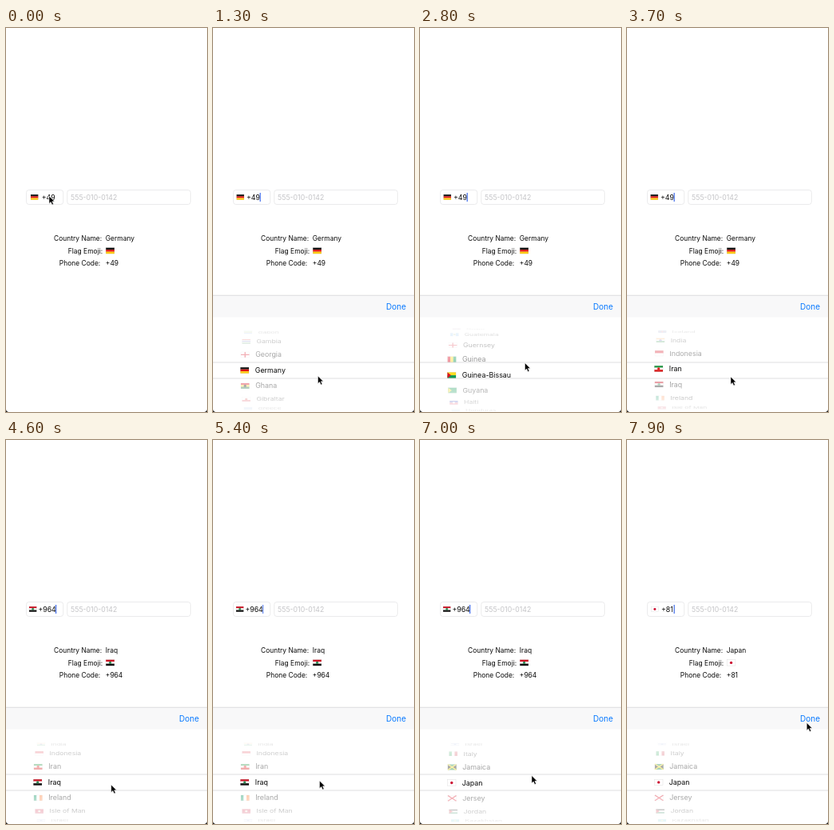
Animation of 252x480 px, one loop 8000 ms. Source, as an HTML page:

```html
<!DOCTYPE html>
<html lang="en">
<head>
<meta charset="utf-8">
<title>Country picker</title>
<style>
html, body { margin: 0; width: 100%; height: 100%; overflow: hidden; background: #fff; }
svg { display: block; width: 100%; height: 100%; }
text { font-family: Inter, Roboto, sans-serif; font-size: 8.45px; fill: #0a0a0a; }
.field { fill: #fff; stroke: #e2e2e4; stroke-width: .7; }
.code { font-size: 8.8px; }
.hint { font-size: 8.75px; fill: #c4c4c7; }
.row { font-size: 8.9px; }
.done { font-size: 10px; fill: #0a7aff; }
</style>
</head>
<body>
<svg viewBox="0 0 252 480" preserveAspectRatio="none">
  <defs>
    <g id="wheel"></g>
    <clipPath id="mid"><path d="M0 418H252V438H0Z"/></clipPath>
    <clipPath id="rest"><path d="M0 362H252V418H0ZM0 438H252V490H0Z"/></clipPath>
    <linearGradient id="fade" x2="0" y2="1">
      <stop offset="0" stop-color="#fff" stop-opacity=".9"/>
      <stop offset=".2" stop-color="#fff" stop-opacity=".5"/>
      <stop offset=".42" stop-color="#fff" stop-opacity="0"/>
      <stop offset=".58" stop-color="#fff" stop-opacity="0"/>
      <stop offset=".8" stop-color="#fff" stop-opacity=".5"/>
      <stop offset="1" stop-color="#fff" stop-opacity=".9"/>
    </linearGradient>
  </defs>
  <rect width="252" height="480" fill="#fff"/>
  <rect class="field" x="25.5" y="202.5" width="46.3" height="18" rx="3.2"/>
  <rect class="field" x="76.8" y="202.5" width="154.6" height="18" rx="3.2"/>
  <g id="fieldFlag"></g>
  <text id="fieldCode" class="code" y="214.5"></text>
  <rect id="caret" y="206" width="1.2" height="11" fill="#3f6bea"/>
  <text class="hint" x="81" y="214.5">555-010-0142</text>
  <text x="60" y="266.2">Country Name:</text>
  <text x="77.8" y="281.7">Flag Emoji:</text>
  <text x="66.8" y="297">Phone Code:</text>
  <text id="name" x="124.8" y="266.2"></text>
  <g id="flag" transform="translate(125.3 274.7)"></g>
  <text id="code" x="124.8" y="297"></text>
  <g id="panel">
    <rect y="334" width="252" height="150" fill="#fff"/>
    <rect y="334" width="252" height="27.5" fill="#f8f8f9"/>
    <rect y="333.8" width="252" height=".7" fill="#cfcfd1"/>
    <text class="done" x="242" y="352" text-anchor="end">Done</text>
    <use href="#wheel" clip-path="url(#rest)" opacity=".46"/>
    <rect y="374" width="252" height="108" fill="url(#fade)"/>
    <use href="#wheel" clip-path="url(#mid)"/>
    <path d="M0 418H252M0 438H252" stroke="#d2d2d4" stroke-width=".7"/>
  </g>
  <path d="M0 477Q.3 479.7 3 480H0ZM252 477Q251.7 479.7 249 480H252Z" fill="#111"/>
  <path id="cursor" d="M0 0V9.4L2.2 7.4L3.8 11L5.5 10.2L3.9 6.8H6.8Z" fill="#000" stroke="#fff" stroke-width=".5"/>
</svg>
<script>
const $ = id => document.getElementById(id);
const LOOP = 8000, MID = 428, RADIUS = 52.5, STEP = 0.38, FIRST = -3;

// name | stripe direction | stripe colours | marks (shape + colour)
const countries = `Gabon|h|3a7 fd3 37c
Gambia|h|d22 fff 239 fff 384
Georgia|h|fff|+d23
Germany|h|111 d11 fc1
Ghana|h|d12 fd2 163|o111
Gibraltar|h|fff fff d23|oc33
Greece|h|26b fff 26b fff 26b
Greenland|h|fff d13|od68
Grenada|h|d12 fd2 384 d12|od12
Guadeloupe|h|111 111 111 25a|ofc2
Guam|h|c23 138 138 138 c23|o7ac
Guatemala|v|5ae fff 5ae|o8a6
Guernsey|h|fff|+d23
Guinea|v|d12 fd2 195
Guinea-Bissau|h|fd2 195|bd12
Guyana|h|195|bfd2
Haiti|h|12a d13|offf
Honduras|h|18c fff 18c
Hong Kong|h|d23|offf
Hungary|h|d34 fff 475
Iceland|h|15a|+d34
India|h|f93 fff 183|o44a
Indonesia|h|d12 fff
Iran|h|294 fff d22|od22
Iraq|h|c12 fff 111|o385
Ireland|v|196 fff f84
Isle of Man|h|c13|oedc
Israel|h|fff 24b fff fff 24b fff|o68c
Italy|v|194 fff c23
Jamaica|h|184 184|l111 xfd1
Japan|h|fff|oc13
Jersey|h|fff|xd23
Jordan|h|111 fff 174|bc12
Kazakhstan|h|1ab|ofd2
Kenya|h|111 b12 b12 163|offf`.split('\n').map(line => {
  const [name, dir, fills, marks = ''] = line.split('|');
  return { name, flag: drawFlag(dir, fills.split(' '), marks) };
});

function drawFlag(dir, fills, marks) {
  const n = fills.length;
  const stripes = fills.map((c, i) => dir === 'h'
    ? `<rect y="${7.4 * i / n}" width="10.6" height="${7.4 / n + .03}" fill="#${c}"/>`
    : `<rect x="${10.6 * i / n}" width="${10.6 / n + .03}" height="7.4" fill="#${c}"/>`);
  const shapes = {
    o: c => `<circle cx="5.3" cy="3.7" r="1.7" fill="${c}"/>`,
    b: c => `<path d="M0 0L4.5 3.7L0 7.4Z" fill="${c}"/>`,
    l: c => `<path d="M0 0L5.3 3.7L0 7.4ZM10.6 0L5.3 3.7L10.6 7.4Z" fill="${c}"/>`,
    '+': c => `<path d="M5.3 0V7.4M0 3.7H10.6" stroke="${c}" stroke-width="1.4"/>`,
    x: c => `<path d="M0 0L10.6 7.4M10.6 0L0 7.4" stroke="${c}" stroke-width="1.4"/>`
  };
  const extra = marks ? marks.split(' ').map(m => shapes[m[0]]('#' + m.slice(1))) : [];
  return stripes.join('') + extra.join('') +
    '<rect width="10.6" height="7.4" fill="none" stroke="#000" stroke-opacity=".13" stroke-width=".5"/>';
}

// Smooth monotone curve through [time, value] points
function track(keys) {
  const slope = i => (keys[i + 1][1] - keys[i][1]) / (keys[i + 1][0] - keys[i][0]);
  const tangents = keys.map((_, i) => {
    if (!i || i === keys.length - 1) return 0;
    const a = slope(i - 1), b = slope(i);
    return a * b > 0 ? 2 * a * b / (a + b) : 0;
  });
  return t => {
    let i = 0;
    while (i < keys.length - 2 && t > keys[i + 1][0]) i++;
    const [t0, a] = keys[i], [t1, b] = keys[i + 1], h = t1 - t0;
    const u = Math.min(1, Math.max(0, (t - t0) / h)), v = 1 - u;
    return a * (1 + 2 * u) * v * v + b * u * u * (3 - 2 * u)
      + h * u * v * (tangents[i] * v - tangents[i + 1] * u);
  };
}

const wheelPos = track([[1350, 0], [1600, 1.5], [2000, 6], [2350, 9], [2650, 10], [2750, 10.3],
  [3050, 14.5], [3350, 18.3], [3700, 20.1], [4000, 20.7], [4300, 21], [5450, 21],
  [5650, 22], [5900, 24], [6300, 25.9], [6700, 26.7], [7100, 27], [8000, 27]]);
const path = [[0, 54, 210], [350, 54, 210], [1000, 131.5, 435], [1400, 131.5, 435],
  [1900, 132.5, 370], [2050, 132.5, 370], [2500, 131, 435], [2700, 131, 435],
  [3000, 133, 372], [3150, 133, 372], [3600, 130, 436], [3900, 130, 436],
  [5300, 133.6, 426], [5550, 133.6, 426], [5850, 136, 376], [5950, 136, 376],
  [6250, 135.2, 425], [6900, 136, 423], [7700, 225.3, 353.5], [8000, 225.3, 353.5]];
const cursorX = track(path.map(p => [p[0], p[1]]));
const cursorY = track(path.map(p => [p[0], p[2]]));
const panelY = track([[150, 148], [300, 75], [480, 12], [680, 0]]);
const blink = track([[0, 1], [640, 1], [720, 0], [930, 0], [1000, 1]]);

// row, dial code, and field layout from each moment on
const states = [
  { at: 0, row: 0, code: '+49', flagX: 31, textX: 44.7 },
  { at: 200, row: 0, code: '+49', flagX: 29.6, textX: 42, caret: 58.6, phase: 670 },
  { at: 4400, row: 21, code: '+964', flagX: 29, textX: 40.4, caret: 62, phase: 4420 },
  { at: 7400, row: 27, code: '+81', flagX: 30.2, textX: 43, caret: 58.6, phase: 7400 }
];

$('wheel').innerHTML = countries.map(c =>
  `<g><g transform="translate(34.4 -3.8)">${c.flag}</g><text class="row" x="52.8" y="3.2">${c.name}</text></g>`).join('');
const rows = [...$('wheel').children];
let shown;

function showState(s) {
  const { name, flag } = countries[s.row - FIRST];
  $('name').textContent = name;
  $('code').textContent = $('fieldCode').textContent = s.code;
  $('flag').innerHTML = $('fieldFlag').innerHTML = flag;
  $('fieldFlag').setAttribute('transform', `translate(${s.flagX} 208.2) scale(.88)`);
  $('fieldCode').setAttribute('x', s.textX);
  $('caret').setAttribute('x', s.caret || 0);
  shown = s;
}

function render(t) {
  const s = states.filter(k => t >= k.at).pop();
  if (s !== shown) showState(s);
  $('caret').setAttribute('opacity', s.caret ? blink((t - s.phase + LOOP) % 1000) : 0);
  $('panel').setAttribute('transform', `translate(0 ${panelY(t)})`);
  $('cursor').setAttribute('transform', `translate(${cursorX(t)} ${cursorY(t)})`);
  const pos = wheelPos(t);
  rows.forEach((row, i) => {
    const angle = (i + FIRST - pos) * STEP;
    const hidden = Math.abs(angle) > 1.45;
    row.setAttribute('display', hidden ? 'none' : 'inline');
    if (hidden) return;
    const cos = Math.cos(angle), sx = 1 - .085 * (1 - cos);
    row.setAttribute('transform',
      `translate(${126 * (1 - sx)} ${MID + RADIUS * Math.sin(angle)}) scale(${sx} ${cos})`);
  });
}

let start;
function tick(now) {
  start ??= now;
  render((now - start) % LOOP);
  requestAnimationFrame(tick);
}
render(0);
requestAnimationFrame(tick);
</script>
</body>
</html>
```
